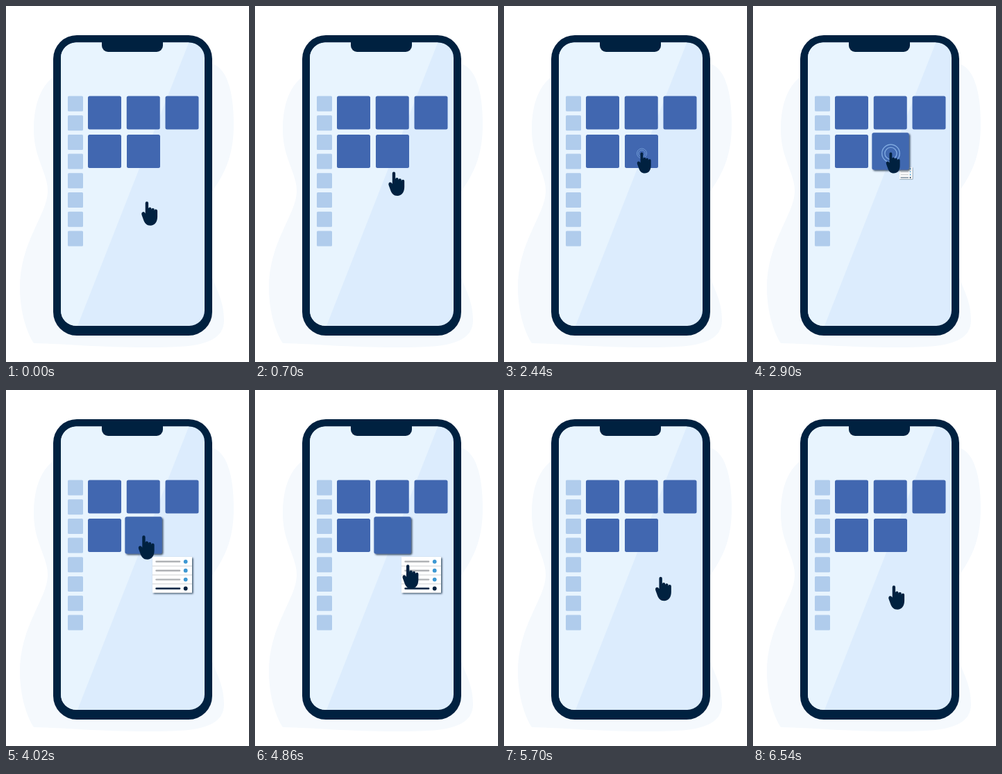
An HTML page that plays this animation: 350x512 px, repeating every 6600 ms.

```html
<!DOCTYPE html>
<html lang="en">
<head>
<meta charset="utf-8">
<style>
  html, body { margin: 0; height: 100%; overflow: hidden; background: #fff; }
  svg { display: block; width: 350px; height: 512px; }
</style>
</head>
<body>
<svg viewBox="0 0 350 512">
  <defs>
    <filter id="shadow" x="-20%" y="-20%" width="150%" height="150%">
      <feDropShadow dx="1.5" dy="1.5" stdDeviation="1.1" flood-color="#001a33" flood-opacity=".75"/>
    </filter>
    <clipPath id="screen"><rect x="79" y="52.5" width="207" height="407.5" rx="22"/></clipPath>
  </defs>
  <path fill="#f5f9fd" d="M68 102C48 118 40 145 40 178C40 220 61 240 60 268C59 300 20 340 20 405C20 440 30 470 40 485C90 486 130 491 205 491C262 491 314 490 314 452C314 425 304 410 296 388V268C312 245 328 220 328 170C328 120 317 88 296 83Z"/>
  <rect x="68" y="42" width="229" height="432" rx="34" fill="#002140"/>
  <g clip-path="url(#screen)">
    <path fill="#dcecfd" d="M79 52H286V460H79Z"/>
    <path fill="#e8f4fe" d="M79 52H263.5L103 460H79Z"/>
  </g>
  <path fill="#002140" d="M138 50H226V57A9 9 0 0 1 217 66H147A9 9 0 0 1 138 57Z"/>
  <g id="sidebar" fill="#b0ccec"></g>
  <g id="tiles" fill="#4167b0"></g>
  <g id="menu" filter="url(#shadow)"><rect x="211" y="240" width="57" height="51.5" fill="#fff"/></g>
  <rect id="active" x="174" y="185" width="48" height="48" rx="2.5" fill="#4167b0"/>
  <g id="ripple" fill="none" stroke="#7fa9e0" stroke-width="1.4">
    <circle r="13"/><circle r="8.8"/>
  </g>
  <path id="hand" fill="#002140" d="M200.7 283.4a2.2 2.2 0 0 1 4.4 0V291.6a2.1 2.1 0 0 1 4.4 .3V292.8a2.1 2.1 0 0 1 4.3 .3V294.4a2.1 2.1 0 0 1 4.3 .4V303C218.1 311 214 315.7 208 315.7C202.5 315.7 200 312.5 198.4 308.5L195.5 300.5C194.8 298 195.8 296.5 197.3 296.2C199 296 200 297.2 200.7 298.6Z"/>
</svg>
<script>
const $ = id => document.getElementById(id);

function add(parent, tag, attrs) {
  const el = document.createElementNS('http://www.w3.org/2000/svg', tag);
  for (const key in attrs) el.setAttribute(key, attrs[key]);
  $(parent).append(el);
}

for (let i = 0; i < 8; i++)
  add('sidebar', 'rect', { x: 89, y: 129.5 + 27.7 * i, width: 22, height: 22, rx: 1.5 });

for (let i = 0; i < 4; i++)
  add('tiles', 'rect', {
    x: 118 + 55.75 * (i % 3), y: 129.5 + 55.6 * Math.floor(i / 3),
    width: 48, height: 48, rx: 2.5
  });

for (let i = 0; i < 4; i++) {
  const y = 246.8 + 12.9 * i, last = i === 3;
  add('menu', 'rect', { x: 215.3, y: y - 1.2, width: 36, height: 2.4, rx: 1.2, fill: last ? '#002140' : '#b0b2b5' });
  add('menu', 'circle', { cx: 258.7, cy: y, r: 2.9, fill: last ? '#002140' : '#3d98d3' });
  if (!last) add('menu', 'rect', { x: 211, y: y + 5.9, width: 57, height: 0.8, fill: '#c4c6c9' });
}

// Linear progress through a time span, clamped to 0..1
const span = (t, from, to) => Math.min(1, Math.max(0, (t - from) / (to - from)));

const scaleAt = (el, x, y, s) =>
  el.setAttribute('transform', `translate(${x} ${y}) scale(${s}) translate(${-x} ${-y})`);

function draw(t) {
  const toTile = span(t, 0, 1200), toMenu = span(t, 4000, 5180), home = span(t, 5600, 6540);
  const x = -5 * toTile + 30.5 * toMenu - 25.5 * home;
  const y = -73 * toTile + 59 * toMenu + 14 * home;
  const press = span(t, 1640, 1840) - span(t, 2960, 3160)
              + span(t, 5180, 5380) - span(t, 5400, 5600);
  const s = 1 - 0.13 * press;
  $('hand').setAttribute('transform',
    `translate(${x + 206.7} ${y + 298.5}) scale(${s}) translate(-206.7 -298.5)`);

  const grow = span(t, 1880, 2920);
  $('ripple').setAttribute('transform', `translate(198.5 212) scale(${grow})`);
  $('ripple').setAttribute('opacity', grow ? 1 - span(t, 2920, 2990) : 0);

  const lift = span(t, 2600, 2800) - span(t, 5400, 5600);
  scaleAt($('active'), 198, 209.3, 1 + 0.11 * lift);
  $('active').setAttribute('filter', lift > 0 ? 'url(#shadow)' : 'none');

  const open = span(t, 2790, 3130) - span(t, 5400, 5600);
  $('menu').style.display = open > 0 ? '' : 'none';
  // Slides down from y = 228 while it grows
  scaleAt($('menu'), 211, 228, open);
}

const start = performance.now();
function loop() {
  draw((performance.now() - start) % 6600);
  requestAnimationFrame(loop);
}
loop();
</script>
</body>
</html>
```
